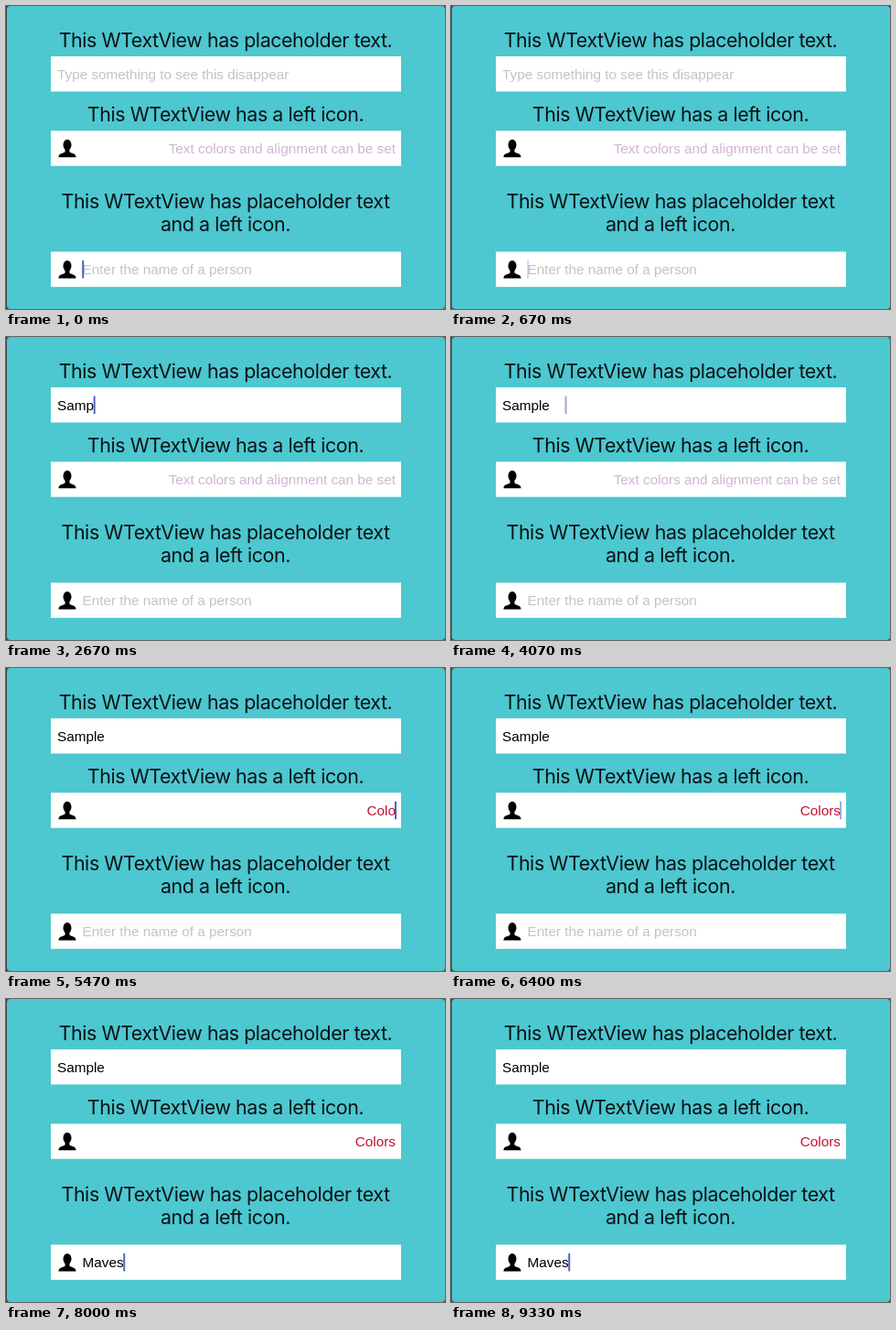
Animation of 480x331 px, one loop 9.39 s. Source, as an HTML page with a canvas:

```html
<!DOCTYPE html>
<html lang="en">
<head>
<meta charset="utf-8">
<title>Text fields</title>
<style>
  html, body { margin: 0; width: 100%; height: 100%; overflow: hidden; }
  canvas { display: block; }
</style>
</head>
<body>
<canvas id="stage" width="480" height="331"></canvas>
<script>
const ctx = document.getElementById('stage').getContext('2d');
const LOOP = 9390;
const HEADING_FONT = '21.4px Inter, sans-serif';
const FIELD_FONT = '15.3px "Liberation Sans", Arial, sans-serif';

const headings = [
  ['This WTextView has placeholder text.', 44.5],
  ['This WTextView has a left icon.', 126],
  ['This WTextView has placeholder text', 220.5],
  ['and a left icon.', 245.5],
];

// Typing starts at `start` with one character every `step` ms.
const fields = [
  { y: 55, x: 56, hint: 'Type something to see this disappear', hintColor: '#c3c3c7',
    text: 'Sample    ', color: '#000', start: 2270, step: 133 },
  { y: 136.3, x: 426, right: true, icon: true, hint: 'Text colors and alignment can be set', hintColor: '#d2b4d4',
    text: 'Colors', color: '#c01030', start: 4870, step: 185 },
  { y: 268.4, x: 83.5, icon: true, hint: 'Enter the name of a person', hintColor: '#c3c3c7',
    text: 'Maves', color: '#000', start: 6970, step: 215 },
];

// Which field has the caret, and from when.
const focus = [[0, 2], [1870, 0], [4600, 1], [6530, 2]];

const clamp = v => Math.max(0, Math.min(1, v));

function blink(ms) {
  const p = ms % 1000;
  return p < 850 ? 1 - clamp((p - 500) / 230) : (p - 850) / 150;
}

function drawPerson(y) {
  ctx.fillStyle = '#000';
  ctx.beginPath();
  ctx.ellipse(67, y + 15.5, 4.5, 6, 0, 0, 2 * Math.PI);
  ctx.fill();
  ctx.beginPath();
  ctx.moveTo(64.7, y + 19);
  ctx.lineTo(69.3, y + 19);
  ctx.lineTo(69.5, y + 23.3);
  ctx.bezierCurveTo(73.5, y + 25.3, 76.5, y + 25, 76.5, y + 29);
  ctx.lineTo(57.5, y + 29);
  ctx.bezierCurveTo(57.5, y + 25, 60.5, y + 25.3, 64.5, y + 23.3);
  ctx.fill();
}

function drawField(field, t, focusTime) {
  const { y, x, right, text, start, step } = field;
  const count = t < start ? 0 : Math.min(text.length, Math.floor((t - start) / step) + 1);
  const typed = text.slice(0, count);

  ctx.fillStyle = '#fff';
  ctx.fillRect(49, y, 383, 38.4);
  if (field.icon) drawPerson(y);

  ctx.font = FIELD_FONT;
  ctx.letterSpacing = '0px';
  ctx.textAlign = right ? 'right' : 'left';
  ctx.fillStyle = count ? field.color : field.hintColor;
  ctx.fillText(typed || field.hint, x, y + 24.8);

  if (focusTime === undefined) return;
  const lastKey = count ? start + (count - 1) * step : focusTime;
  const caretX = right ? x - 1 : x - 0.3 + ctx.measureText(typed).width;
  ctx.globalAlpha = blink(t - lastKey);
  ctx.fillStyle = '#4864c4';
  ctx.fillRect(caretX, y + 9.5, 2, 19.5);
  ctx.globalAlpha = 1;
}

function draw(now) {
  const t = now % LOOP;
  ctx.fillStyle = '#444a4c';
  ctx.fillRect(0, 0, 480, 331);
  ctx.fillStyle = '#4dc7d0';
  ctx.beginPath();
  ctx.roundRect(1, 0, 479, 331, 4);
  ctx.fill();

  ctx.fillStyle = '#0b1214';
  ctx.font = HEADING_FONT;
  ctx.letterSpacing = '-0.42px';
  ctx.textAlign = 'center';
  for (const [text, y] of headings) ctx.fillText(text, 240, y);

  const [since, active] = focus.findLast(([from]) => t >= from);
  fields.forEach((field, i) => drawField(field, t, i === active ? since : undefined));
}

const origin = performance.now();
function tick() {
  draw(performance.now() - origin);
  requestAnimationFrame(tick);
}
tick();
</script>
</body>
</html>
```
